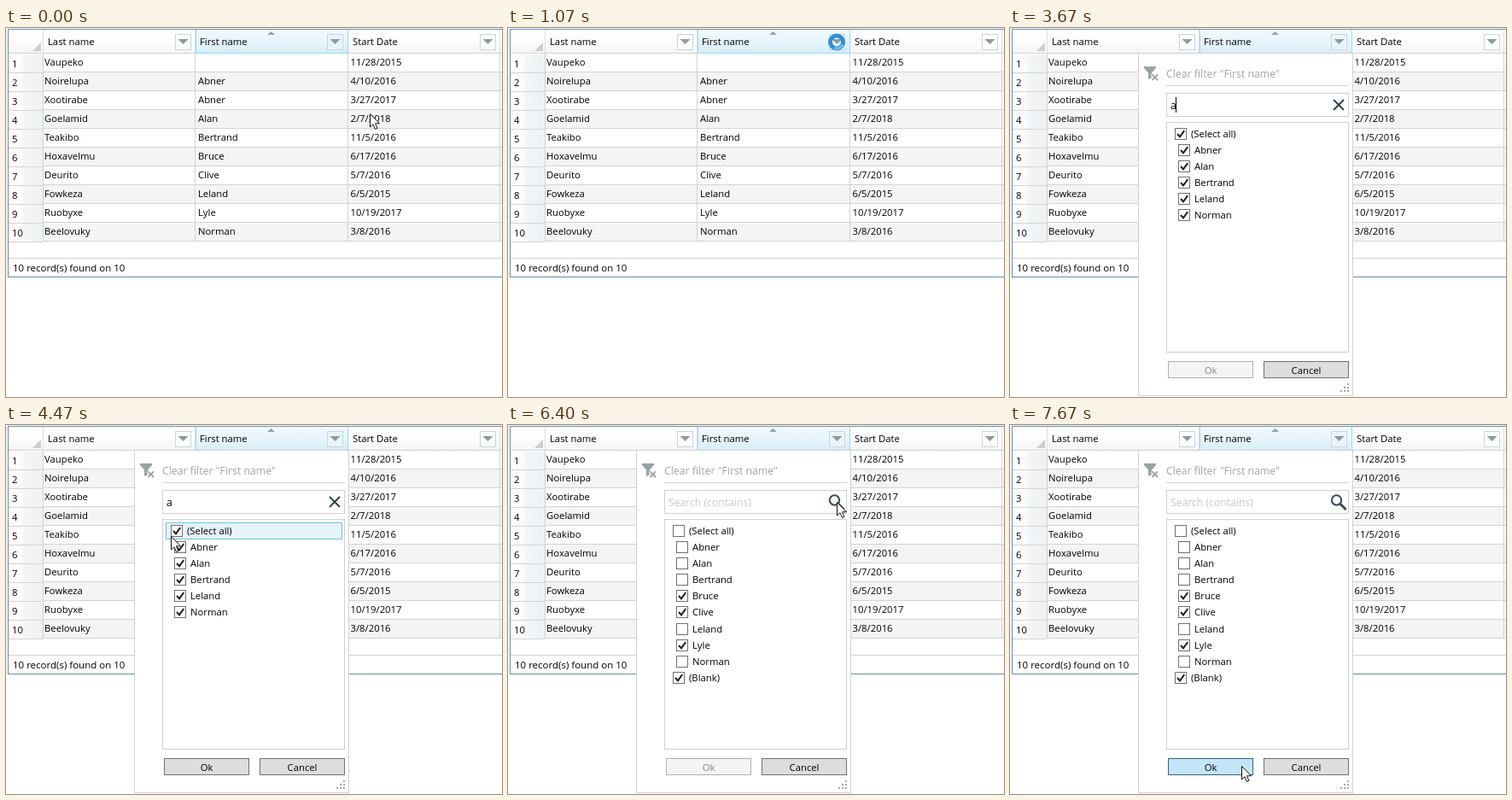
An HTML page with a canvas that plays this animation: 581x432 px, repeating every 8000 ms.

```html
<!DOCTYPE html>
<html lang="en">
<head>
<meta charset="utf-8">
<title>Column filter</title>
<style>
  html, body { margin: 0; width: 100%; height: 100%; overflow: hidden; background: #fff; }
  canvas { display: block; }
</style>
</head>
<body>
<canvas id="stage" width="581" height="432"></canvas>
<script>
const ctx = document.getElementById('stage').getContext('2d');
const LOOP = 8000, TICK = 200 / 3, BLINK = 536, HOVER_LAG = 33;
const FONT = '"Open Sans", "Noto Sans", sans-serif';

const rows = [
  ['Vaupeko', '', '11/28/2015'],
  ['Noirelupa', 'Abner', '4/10/2016'],
  ['Xootirabe', 'Abner', '3/27/2017'],
  ['Goelamid', 'Alan', '2/7/2018'],
  ['Teakibo', 'Bertrand', '11/5/2016'],
  ['Hoxavelmu', 'Bruce', '6/17/2016'],
  ['Deurito', 'Clive', '5/7/2016'],
  ['Fowkeza', 'Leland', '6/5/2015'],
  ['Ruobyxe', 'Lyle', '10/19/2017'],
  ['Beelovuky', 'Norman', '3/8/2016']
];
const firstNames = [...new Set(rows.map(r => r[1]).filter(Boolean))];
const allItems = ['(Select all)', ...firstNames, '(Blank)'];
const matches = ['(Select all)', ...firstNames.filter(n => /a/i.test(n))];

// Eased pointer moves, each from where the last one stopped
const home = { x: 426, y: 100 };
const moves = [
  { from: 0, to: 733, x: 385, y: 17 },      // filter button
  { from: 1467, to: 1867, x: 300, y: 91 },  // search box
  { from: 4000, to: 4267, x: 165, y: 186 },
  { from: 4267, to: 4433, x: 193, y: 130 }, // select all
  { from: 4467, to: 4800, x: 198, y: 119 },
  { from: 5267, to: 5667, x: 383, y: 96 },  // clear search
  { from: 5667, to: 6067, x: 385, y: 90 },
  { from: 6800, to: 6933, x: 282, y: 237 },
  { from: 6933, to: 7300, x: 262, y: 408 },
  { from: 7300, to: 7533, x: 271, y: 399 }  // ok
];
const clamp = v => Math.min(1, Math.max(0, v));
const ease = u => u * u * (3 - 2 * u);

function pointer(t) {
  let { x, y } = home;
  for (const m of moves) {
    const f = ease(clamp((t - m.from) / (m.to - m.from)));
    x += (m.x - x) * f;
    y += (m.y - y) * f;
  }
  return { x: Math.round(x), y: Math.round(y) };
}

const inside = (p, x, y, w, h) => p.x >= x && p.x <= x + w && p.y >= y && p.y <= y + h;
const itemY = i => Math.round(123.75 + 19.13 * i);

function fill(x, y, w, h, color) {
  ctx.fillStyle = color;
  ctx.fillRect(x, y, w, h);
}

function box(x, y, w, h, bg, border) {
  fill(x, y, w, h, border);
  fill(x + 1, y + 1, w - 2, h - 2, bg);
}

function text(s, x, y, size = 11.3, color = '#000', align = 'left') {
  ctx.font = `${size}px ${FONT}`;
  ctx.textAlign = align;
  ctx.fillStyle = color;
  ctx.fillText(s, x, y);
}

function trace(points, x = 0, y = 0) {
  ctx.beginPath();
  for (let i = 0; i < points.length; i += 2) ctx.lineTo(x + points[i], y + points[i + 1]);
}

function poly(points, color, x, y) {
  trace(points, x, y);
  ctx.fillStyle = color;
  ctx.fill();
}

function stroke(color, width) {
  ctx.strokeStyle = color;
  ctx.lineWidth = width;
  ctx.stroke();
}

function line(points, color, width, x, y) {
  trace(points, x, y);
  stroke(color, width);
}

function cross(x, y, r, color, width) {
  line([-r, -r, r, r], color, width, x, y);
  line([r, -r, -r, r], color, width, x, y);
}

function arc(x, y, r, a, b, color, width) {
  ctx.beginPath();
  ctx.arc(x, y, r, a, b);
  stroke(color, width);
}

function gradient(x0, y0, x1, y1, ...colors) {
  const g = ctx.createLinearGradient(x0, y0, x1, y1);
  colors.forEach((c, i) => g.addColorStop(i / (colors.length - 1), c));
  return g;
}

function header(x, label, sorted) {
  if (sorted) {
    box(x, 1, 179, 29, gradient(0, 2, 0, 30, '#f2f9fc', '#e6f4fb', '#d8ecf6'), '#96d9f9');
    poly([-4.5, 4, 0, 0, 4.5, 4], '#8ba4b0', x + 88.5, 4);
  }
  text(label, x + 5, 20);
  box(x + 154, 7, 19, 19, sorted ? '#e9f4fa' : '#fbfcfc', '#ccd4d8');
  poly([-6, 0, 6, 0, 0, 6], '#8e9b9e', x + 163.5, 13);
}

function grid() {
  const columns = [43, 221, 400, 578], rule = '#d3d3d3', frame = '#688caf';
  fill(0, 0, 581, 432, '#fff');
  fill(3, 2, 578, 28, gradient(0, 2, 0, 30, '#ffffff', '#fcfcfd', '#f3f4f7'));
  columns.forEach(x => fill(x, 2, 1, 28, '#dcdfe2'));
  fill(3, 29, 578, 1, rule);
  poly([41, 17, 41, 27, 31, 27], '#cdcdcd');
  header(44, 'Last name');
  header(222, 'First name', true);
  header(401, 'Start Date');

  rows.forEach(([last, first, date], i) => {
    const y = 30 + 22 * i;
    fill(44, y, 537, 21, i % 2 ? '#f4f4f4' : '#fff');
    fill(44, y + 21, 537, 1, rule);
    fill(3, y + 1, 17, 21, gradient(3, 0, 20, 0, '#ffffff', '#f9fafb'));
    fill(20, y + 1, 23, 21, gradient(20, 0, 43, 0, '#f4f6f8', '#edf1f4'));
    fill(3, y + 22, 40, 1, rule);
    text(i + 1, 7, y + 15.5);
    text(last, 45, y + 14);
    text(first, 225, y + 14);
    text(date, 403.5, y + 14);
  });
  columns.forEach(x => fill(x, 30, 1, 220, rule));

  fill(3, 269, 578, 1, rule);
  text('10 record(s) found on 10', 8, 285, 11.5);
  fill(2, 1, 579, 1, frame);
  fill(2, 1, 1, 291, frame);
  fill(2, 291, 579, 1, frame);
}

function funnel() {
  poly([0, 0, 14, 0, 14, 2, 9, 7.5, 9, 13, 5, 15, 5, 7.5, 0, 2], '#98a3a5', 157, 45);
  cross(169.7, 57.7, 3.6, '#fff', 4);
  cross(169.7, 57.7, 3.3, '#98a3a5', 1.8);
}

function searchBox(s) {
  box(183, 76, 214, 28, '#fff', '#cfcfcf');
  if (s.typed) {
    text('a', 188, 95, 12.2);
    cross(385, 90, 6, s.cursor === 'hand' ? '#f5271c' : '#2c444e', 2);
  } else {
    text('Search (contains)', 188, 95, 12.2, '#c6c9cb');
    arc(382.5, 88, 5.7, 0, 7, '#344c56', 2);
    line([387, 92.5, 393.5, 99], '#344c56', 3);
  }
  if (s.caret) fill(s.typed ? 194 : 188, 81, 1, 18, '#000');
}

function list(s) {
  box(183, 110, 214, 270, '#fff', '#cfcfcf');
  s.items.forEach((name, i) => {
    const x = name[0] === '(' ? 193 : 197, y = itemY(i);
    if (i === s.hover) box(187, y - 10, 207, 20, '#e5f3fb', '#70c0e7');
    box(x, y - 7, 14, 14, '#fff', '#707070');
    if (s.checked(name)) line([3, 7, 6, 10.3, 11.2, 3.2], '#212121', 2, x, y - 7);
    text(name, x + 19, y + 4);
  });
}

const looks = {
  normal: ['#dddddd', '#707070', '#000'],
  disabled: ['#f4f4f4', '#adb2b5', '#838383'],
  hover: ['#bee6fd', '#3c7fb1', '#000'],
  pressed: ['#c4e5f6', '#2c628b', '#000']
};

function button(x, label, look) {
  const [bg, border, ink] = looks[look];
  box(x, 390, 100, 20, bg, border);
  text(label, x + 50, 404.5, 11.3, ink, 'center');
}

function popup(s) {
  box(150, 29, 252, 402, '#fff', '#cfd1d3');
  funnel();
  text('Clear filter "First name"', 183, 58, 12.3, '#a0a5a7');
  fill(183, 67, 214, 1, '#d3d3d3');
  searchBox(s);
  list(s);
  button(185, 'Ok', s.ok);
  button(297, 'Cancel', 'normal');
  for (let r = 0; r < 3; r++)
    for (let c = 2 - r; c < 3; c++) fill(387 + c * 4, 416 + r * 4, 2, 2, '#a3a8ab');
}

const cursors = {
  arrow(x, y) {
    trace([0, 0, 0, 15.5, 3.5, 12.3, 6, 18, 8.5, 17, 6, 11.3, 11, 11.3], x + .5, y + .5);
    ctx.closePath();
    ctx.fillStyle = '#fff';
    ctx.fill();
    stroke('#111', 1);
  },
  beam(x, y) {
    fill(x, y - 7, 1, 15, '#111');
    [-8, 8].forEach(d => fill(x - 3, y + d, 7, 1, '#111'));
  },
  hand(x, y) {
    ctx.beginPath();
    ctx.roundRect(x - 1.5, y + .5, 4, 14, 2);
    ctx.roundRect(x - 3.5, y + 7.5, 14, 15, [2, 4, 4, 7]);
    stroke('#111', 2);
    ctx.fillStyle = '#fff';
    ctx.fill();
    for (let d = 3; d < 10; d += 3) fill(x + d, y + 7, 1, 4, '#111');
  },
  busy(x, y, t) {
    const a = t / 160;
    arc(x, y - .5, 7.5, 0, 7, '#2e8fd8', 5);
    arc(x, y - .5, 7.5, a, a + 1.6, '#6fb9ee', 3.5);
  }
};

function stateAt(t) {
  // The picture refreshes 15 times a second
  const q = Math.floor(t / TICK + .06) * TICK + 1;
  const during = (a, b) => q >= a && q < b;
  const p = pointer(q), seen = pointer(q - HOVER_LAG);
  const open = q >= 1133, typed = during(3665, 6400);

  let cursor = 'arrow';
  if (during(1000, 1133)) cursor = 'busy';
  else if (during(3665, 4066)) cursor = '';
  else if (typed && inside(p, 377, 82, 18, 17)) cursor = 'hand';
  else if (open && inside(p, 184, 77, 190, 26)) cursor = 'beam';

  const items = typed ? matches : allItems;
  const over = open && cursor && inside(seen, 187, 114, 207, 261);
  const hover = over ? items.findIndex((_, i) => Math.abs(seen.y - itemY(i)) <= 9.5) : -1;

  const enabled = during(3866, 5000) || q >= 6466;
  let ok = enabled ? 'normal' : 'disabled';
  if (enabled && inside(p, 185, 390, 100, 20)) ok = q >= 7666 ? 'pressed' : 'hover';

  const sinceKey = q - (typed ? 3665 : 1660);
  return {
    q, p, open, typed, cursor, items, hover, ok,
    caret: during(1660, 4800) && sinceKey % (2 * BLINK) < BLINK,
    checked: name => q < 4933 || (!typed && !matches.includes(name))
  };
}

function draw(t) {
  const s = stateAt(t);
  grid();
  if (s.open) popup(s);
  if (s.cursor) cursors[s.cursor](s.p.x, s.p.y, s.q);
}

function loop() {
  draw(performance.now() % LOOP);
  requestAnimationFrame(loop);
}
loop();
</script>
</body>
</html>
```
